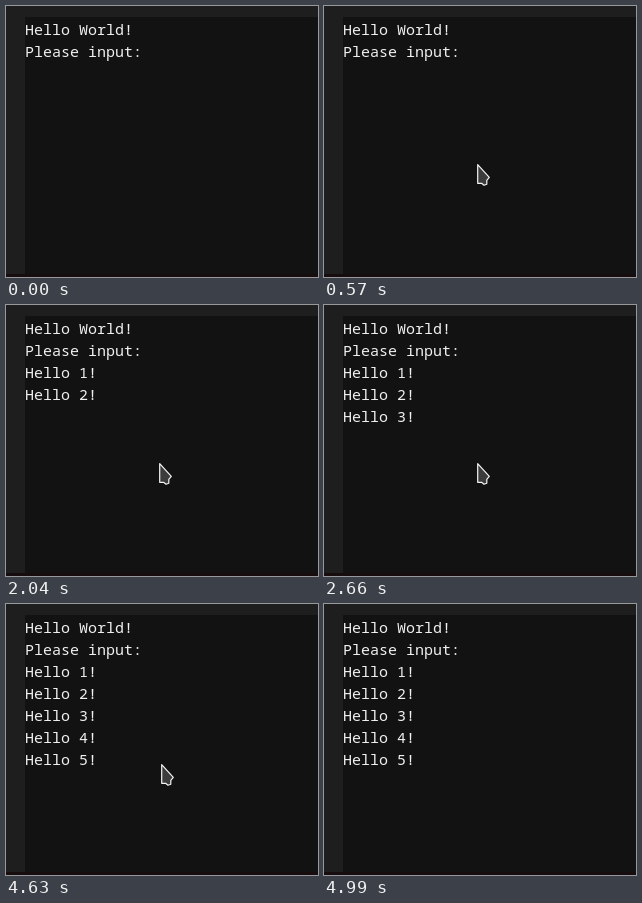
An HTML page for the animation above (5890 ms loop, 312 by 271 pixels).

```html
<!DOCTYPE html>
<html lang="en">
<head>
<meta charset="utf-8">
<title>Console input</title>
<style>
  html, body { margin: 0; width: 100%; height: 100%; overflow: hidden; background: #1e1e1e; }
  svg { display: block; width: 312px; height: 271px; }
  text { font: 15px "Noto Sans Mono", "DejaVu Sans Mono", monospace; fill: #f0f0f0; white-space: pre; }
</style>
</head>
<body>
<svg viewBox="0 0 312 271">
  <rect width="312" height="271" fill="#1e1e1e"/>
  <rect x="19" y="11" width="293" height="260" fill="#121212"/>
  <rect y="268" width="312" height="3" fill="#170c0e"/>
  <g id="lines"></g>
  <path id="cursor" d="M.7 .7V19.3H4.6L7 21.2L9.8 20.2V16.4L12.3 13.4Z"
        fill="#3c3c3c" stroke="#f4f4f4" stroke-width="1.2" stroke-linejoin="round"/>
  <circle id="click" cx="154" cy="160" r="15" fill="#ff0" fill-opacity=".47"/>
</svg>
<script>
const LOOP = 5890;
const LEFT = 19, BASELINE = 29, LINE = 22;

// [time shown, text]
const output = [
  [0, "Hello World!"], [0, "Please input:"],
  [1420, "Hello 1!"], [2040, "Hello 2!"], [2660, "Hello 3!"],
  [3480, "Hello 4!"], [4140, "Hello 5!"]
];

// [time, x, y] of the pointer tip, held until the next entry
const path = [
  [290, 231, 223], [330, 195, 200], [370, 171, 180], [410, 162, 170],
  [450, 157, 163], [490, 154, 160], [570, 153, 158]
];
for (let i = 0; i < 9; i++) {
  const e = (i / 8) ** 1.4;
  path.push([4630 + i * 40, Math.round(155 + 147 * e), Math.round(160 + 100 * e)]);
}
const EXIT = 4990;

const $ = id => document.getElementById(id);
const show = (el, on) => el.setAttribute("visibility", on ? "visible" : "hidden");

const rows = output.map(([at, str], i) => {
  const el = document.createElementNS("http://www.w3.org/2000/svg", "text");
  el.setAttribute("x", LEFT);
  el.setAttribute("y", BASELINE + i * LINE);
  el.textContent = str;
  $("lines").append(el);
  return { at, el };
});

function draw(t) {
  rows.forEach(({ at, el }) => show(el, t >= at));
  const pos = path.filter(p => p[0] <= t).pop();
  show($("cursor"), pos && t < EXIT);
  if (pos) $("cursor").setAttribute("transform", `translate(${pos[1]} ${pos[2]})`);
  show($("click"), t >= 730 && t < 850);
}

function tick() {
  draw(performance.now() % LOOP);
  requestAnimationFrame(tick);
}
tick();
</script>
</body>
</html>
```
